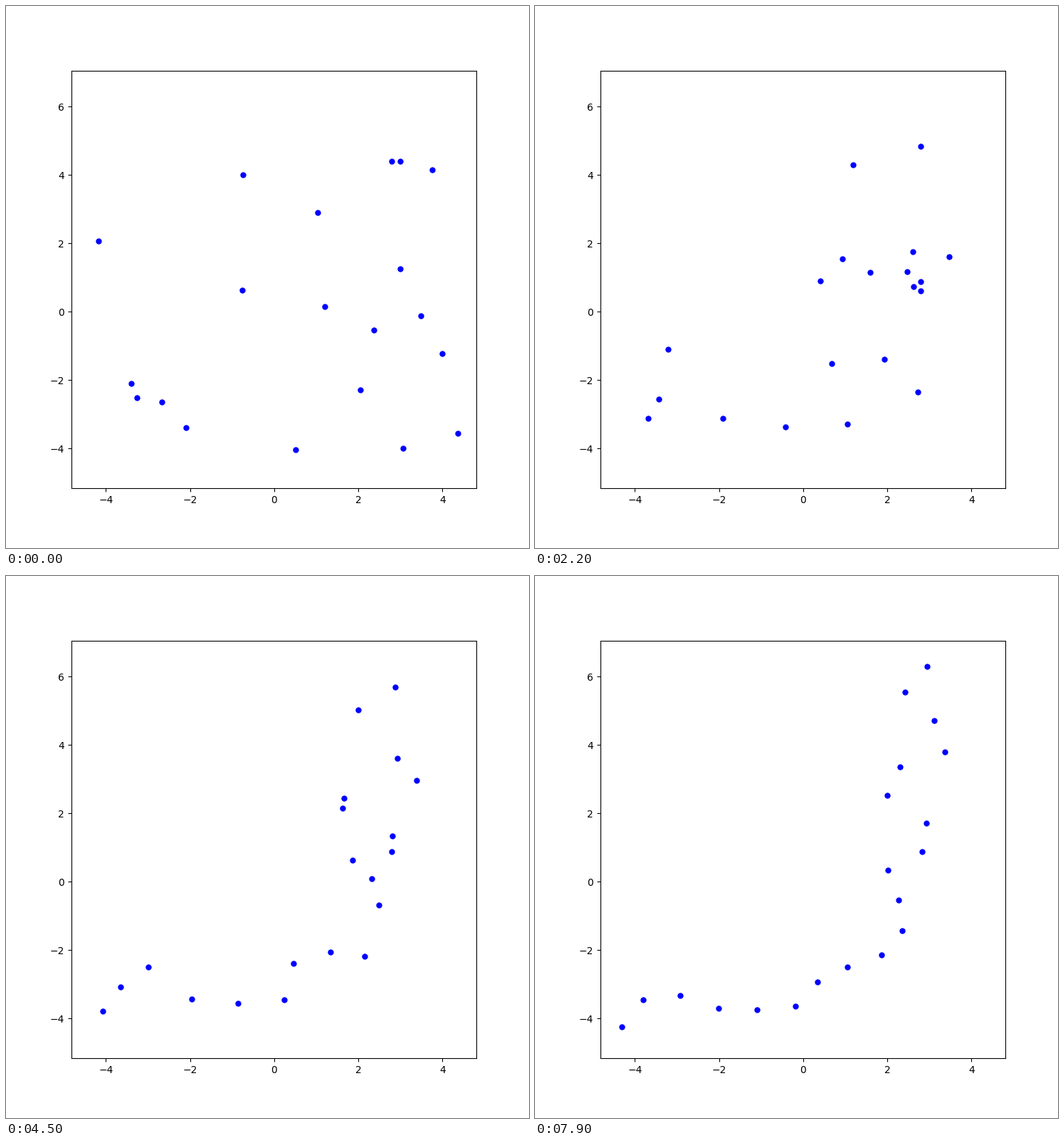
Animation of 735 by 761 pixels, one loop 8000 ms. Source, as a matplotlib script:

```python
import numpy as np
import matplotlib.pyplot as plt
from matplotlib.animation import FuncAnimation

W, H, DPI = 735, 761, 100
STEPS, INTERVAL = 80, 100
ORIGIN = np.array([377.0, 429.7])   # pixel position of (0, 0)
UNIT = np.array([59.15, -48.0])     # pixels per data unit
PULL = np.array([0.2, 0.55])        # how far the links draw the dots inward
RATE = 3.2                          # how quickly the chain cools down


def to_data(*pixels):
    return (np.array(pixels) - ORIGIN) / UNIT


# The chain from one end to the other, before and after it unfolds.
scattered = to_data(
    (184, 550), (176, 530), (130, 330), (253, 592), (407, 623),
    (558, 621), (448, 422), (583, 435), (635, 600), (599, 230),
    (554, 218), (438, 290), (554, 369), (517, 455), (332, 399),
    (219, 556), (613, 488), (498, 539), (333, 237), (542, 218))
unfolded = to_data(
    (122, 633), (152, 595), (204, 589), (258, 607), (312, 609),
    (366, 604), (397, 570), (439, 549), (487, 532), (516, 498),
    (511, 455), (496, 413), (544, 387), (550, 347), (495, 308),
    (513, 268), (576, 247), (561, 203), (520, 163), (551, 127))
center = scattered.mean(axis=0)


def chain_at(step):
    """Relax towards the unfolded chain, drawn inward on the way."""
    u = step / (STEPS - 1)
    done = (1 - np.exp(-RATE * u)) / (1 - np.exp(-RATE))
    spots = scattered + done * (unfolded - scattered)
    return spots + PULL * done * (1 - done) * (center - spots)


fig, ax = plt.subplots(figsize=(W / DPI, H / DPI), dpi=DPI)
fig.subplots_adjust(left=0.125, bottom=0.1105, right=0.8995, top=0.8805)
ax.set_xlim(-4.82, 4.81)
ax.set_ylim(-5.16, 7.05)
dots, = ax.plot([], [], "bo", markersize=5)


def draw(step):
    dots.set_data(*chain_at(step).T)
    return dots,


anim = FuncAnimation(fig, draw, frames=STEPS, interval=INTERVAL,
                     repeat=True, repeat_delay=0)
plt.show()
```
